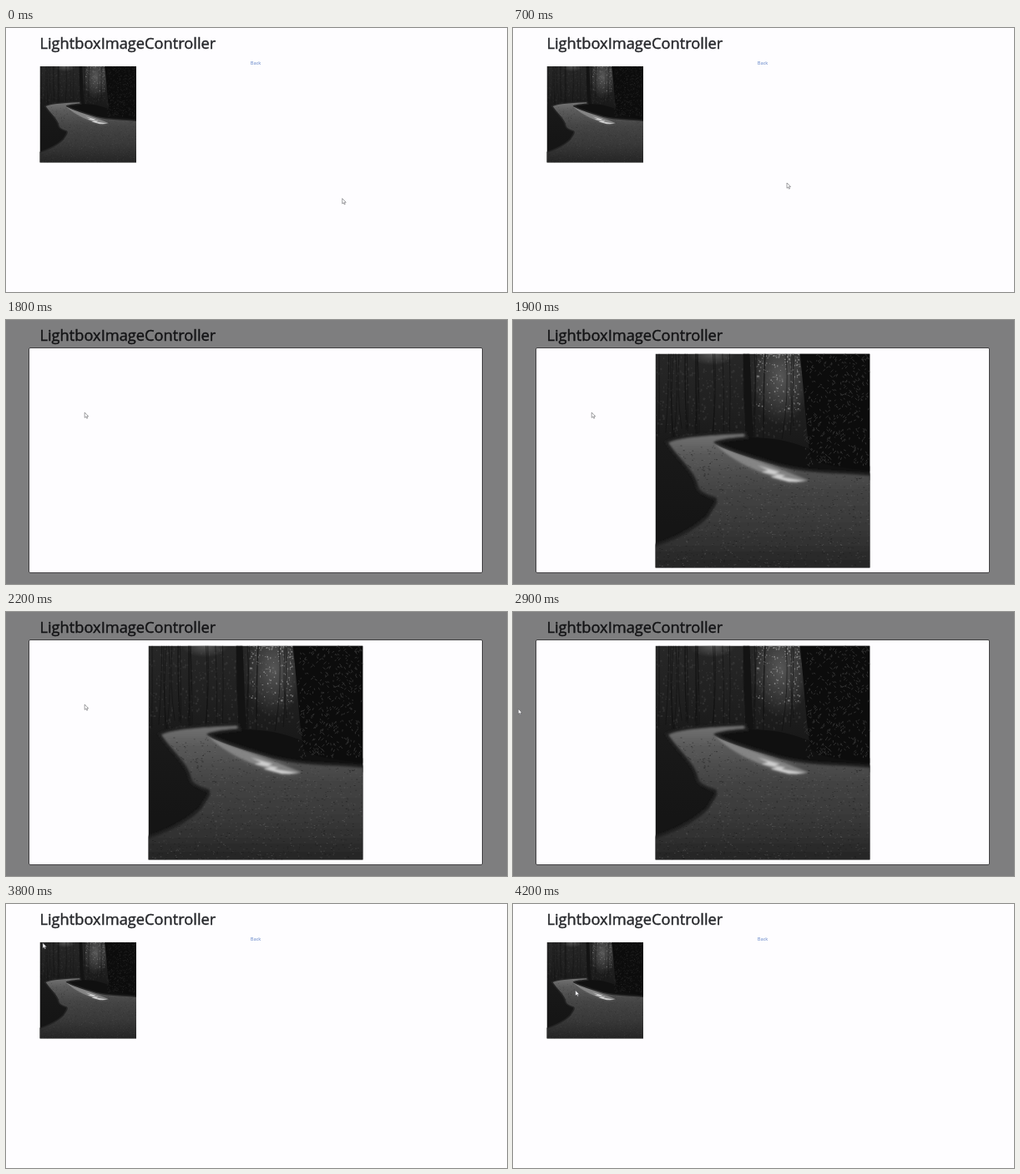
Animation of 600 by 317 pixels, one loop 4.3 s. Source, as an HTML page:

```html
<!DOCTYPE html>
<html lang="en">
<head>
<meta charset="utf-8">
<title>Lightbox</title>
<style>
  html, body { margin: 0; width: 100%; height: 100%; overflow: hidden; background: #fefdff; }
  svg { display: block; width: 100%; height: 100%; }
  text { font-family: "Open Sans", "Noto Sans", sans-serif; }
</style>
</head>
<body>
<svg viewBox="0 0 600 317" xmlns="http://www.w3.org/2000/svg">
  <defs>
    <linearGradient id="woods" x2="0" y2="1">
      <stop offset="0" stop-color="#272727"/>
      <stop offset=".25" stop-color="#202020"/>
      <stop offset=".42" stop-color="#191919"/>
      <stop offset=".8" stop-color="#151515"/>
    </linearGradient>
    <linearGradient id="tar" gradientUnits="userSpaceOnUse" x1="0" y1="96" x2="0" y2="257">
      <stop offset="0" stop-color="#747474"/>
      <stop offset=".15" stop-color="#5a5a5a"/>
      <stop offset=".4" stop-color="#444"/>
      <stop offset=".7" stop-color="#383838"/>
      <stop offset="1" stop-color="#252525"/>
    </linearGradient>
    <radialGradient id="glow">
      <stop offset="0" stop-color="#777" stop-opacity=".6"/>
      <stop offset="1" stop-color="#777" stop-opacity="0"/>
    </radialGradient>
    <filter id="soft" x="-10%" y="-10%" width="120%" height="120%"><feGaussianBlur stdDeviation="1.2"/></filter>
    <clipPath id="frame"><rect width="257" height="257"/></clipPath>
    <clipPath id="roadClip"><use href="#road"/></clipPath>
    <path id="road" d="M16 107C30 100 70 98 106 96.500L107 99C85 101 67 104 70 107C80 115 110 124 150 136C185 145 220 143 257 147V262H-6V234C30 222 50 210 64 196C70 185 78 178 72 172C60 168 54 165 52 160C48 140 30 128 16 107Z"/>
    <g id="photo" clip-path="url(#frame)">
      <rect width="257" height="257" fill="url(#woods)"/>
      <ellipse cx="150" cy="28" rx="36" ry="58" fill="url(#glow)"/>
      <ellipse cx="68" cy="0" rx="28" ry="14" fill="url(#glow)"/>
      <path id="mottle" fill="#555" opacity=".3"/>
      <path id="sky" fill="#aaa" opacity=".6"/>
      <path id="trunks" stroke="#101010" fill="none" opacity=".6"/>
      <path d="M105 0H113L117 102H108Z" fill="#131313"/>
      <path d="M70 107C85 100 130 98 160 106S220 130 257 135V152C200 150 160 145 125 131C100 123 72 115 70 107Z" fill="#101010"/>
      <path d="M173 0H257V141C225 136 200 136 186 124C180 90 178 40 173 0Z" fill="#0c0c0c"/>
      <path id="leaves" stroke="#303030" fill="none"/>
      <g filter="url(#soft)">
        <use href="#road" fill="none" stroke="#242424" stroke-width="7"/>
        <use href="#road" fill="url(#tar)"/>
      </g>
      <g clip-path="url(#roadClip)">
        <path id="lightGrain" fill="#777" opacity=".35"/>
        <path id="darkGrain" fill="#111" opacity=".4"/>
        <ellipse cx="135" cy="138" rx="54" ry="13" fill="url(#glow)" transform="rotate(22 135 138)"/>
        <g filter="url(#soft)">
          <path d="M70 107C90 118 125 129 184 152L168 155C130 146 92 130 70 107Z" fill="#929292" opacity=".75"/>
          <path d="M122 134L149 142L143 144L156 146L151 148L180 153L160 154L138 148L146 146L127 142L135 140Z" fill="#cecece"/>
        </g>
      </g>
    </g>
  </defs>

  <rect width="600" height="317" fill="#fefdff"/>
  <text x="40.500" y="25" font-size="18.250" fill="#27282c" stroke="#27282c" stroke-width=".45">LightboxImageController</text>
  <text x="292.800" y="44" font-size="5.700" fill="#5f80c6">Back</text>
  <use href="#photo" transform="translate(40.500 46) scale(.4494)"/>

  <g id="lightbox">
    <rect width="600" height="317" fill="#000" opacity=".5"/>
    <rect x="27.500" y="33.500" width="543" height="270" rx="1.500" fill="#fefdff" stroke="#414042"/>
    <use id="large" href="#photo" transform="translate(170.500 40.500)"/>
  </g>

  <path id="cursor" d="M0 0V6.300L1.500 5L2.500 7.200L3.500 6.800L2.600 4.600H4.500Z" fill="#fff" stroke="#55555a" stroke-width=".55" stroke-linejoin="round"/>
</svg>
<script>
const $ = id => document.getElementById(id);
const LOOP = 4300, TICK = 100;
const OPEN = 1800, LOADED = 1900, CLOSE = 3400;

// Pointer tip: time, x, y
const path = [
  [0, 402.7, 204.7], [500, 402.7, 204.7], [600, 388, 201], [700, 328, 186],
  [800, 238, 163], [900, 162, 143], [1000, 121, 131], [1100, 102, 125.7],
  [1200, 97, 118], [1300, 95, 113], [1400, 94.2, 111], [2600, 94.2, 111],
  [2700, 70, 112.4], [2800, 25, 115], [2900, 6.3, 116.3], [3400, 6.3, 116.3],
  [3900, 53.5, 29.5], [4000, 64, 68], [4100, 72, 109], [4200, 74.8, 103.8], [4300, 74.8, 103.8]
];

let seed = 7;
const rand = (a, b) => {
  seed = (seed * 16807) % 2147483647;
  return a + (b - a) * seed / 2147483647;
};
const scatter = (id, count, mark) =>
  $(id).setAttribute('d', Array.from({ length: count }, mark).join(''));
const dot = (x, y, w, h) =>
  `M${x.toFixed(1)} ${y.toFixed(1)}h${w.toFixed(1)}v${h.toFixed(1)}h${(-w).toFixed(1)}z`;

scatter('mottle', 500, () => dot(rand(0, 175), rand(0, 100), rand(.8, 2.5), rand(.8, 3)));
scatter('sky', 190, () => {
  const y = 70 * rand(0, 1) ** 2;
  return dot(172 - 52 * rand(0, 1) ** 1.4, y, rand(.5, 1.8), rand(.6, 2.2));
});
scatter('trunks', 26, () => {
  const x = rand(0, 172);
  return `M${x} 0Q${x + rand(-4, 4)} 50 ${x + rand(-5, 5)} ${rand(88, 106)}`;
});
scatter('leaves', 420, () => {
  const x = rand(180, 256), y = rand(0, 134);
  return `M${x} ${y}l${rand(-3, 3)} ${rand(1, 3)}`;
});
const grain = () => dot(rand(0, 257), 110 + 147 * rand(0, 1), rand(.6, 2), rand(.5, 1.2));
scatter('lightGrain', 900, grain);
scatter('darkGrain', 900, grain);

function pointer(t) {
  const i = path.findIndex(p => p[0] > t);
  const [t0, x0, y0] = path[i - 1], [t1, x1, y1] = path[i];
  const k = (t - t0) / (t1 - t0);
  return [x0 + (x1 - x0) * k, y0 + (y1 - y0) * k];
}

function draw(ms) {
  const t = Math.floor((ms % LOOP) / TICK) * TICK;
  $('lightbox').style.display = t >= OPEN && t < CLOSE ? '' : 'none';
  $('large').style.display = t >= LOADED ? '' : 'none';
  $('cursor').setAttribute('transform', `translate(${pointer(t)})`);
}

let start;
function tick(now) {
  start ??= now;
  draw(now - start);
  requestAnimationFrame(tick);
}
draw(0);
requestAnimationFrame(tick);
</script>
</body>
</html>
```
